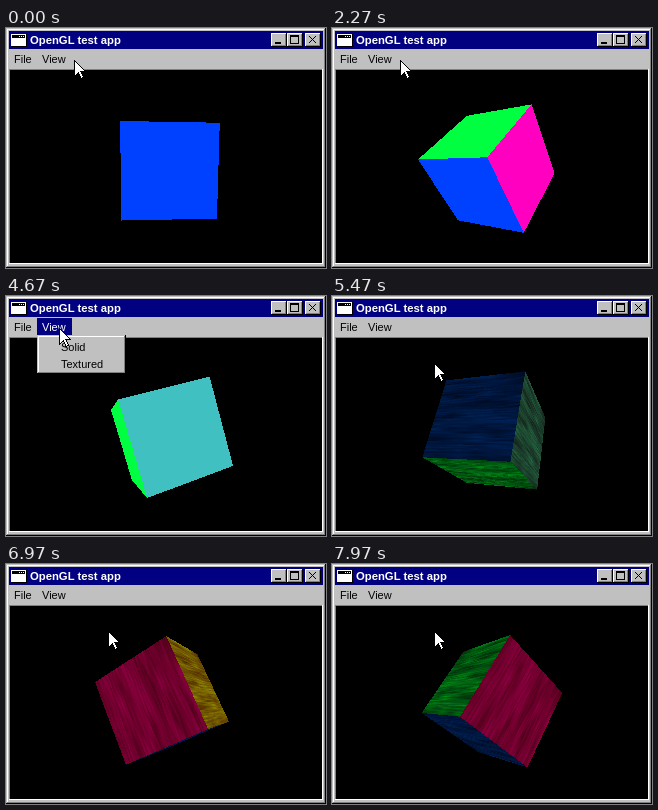
Animation of 320x240 px, one loop 8000 ms. Source, as an HTML page with a canvas:

```html
<!DOCTYPE html>
<html lang="en">
<head>
<meta charset="utf-8">
<title>OpenGL test app</title>
<style>
  html, body { margin: 0; width: 100%; height: 100%; overflow: hidden; background: #c0c0c0; }
  svg, canvas { position: absolute; left: 0; top: 0; }
  canvas { left: 80px; top: 65px; }
  svg { shape-rendering: crispEdges; font: 11px "Liberation Sans", Arial, sans-serif; }
  .title { font-weight: bold; font-size: 11.3px; fill: #fff; }
  .navy { fill: #000080; }
</style>
</head>
<body>
<svg width="320" height="240">
  <defs>
    <g id="button">
      <path d="M0 0H16V14H0Z"/>
      <path d="M0 0H15V13H0Z" fill="#fff"/>
      <path d="M1 1H15V13H1Z" fill="#808080"/>
      <path d="M1 1H14V12H1Z" fill="#c0c0c0"/>
    </g>
  </defs>
  <path d="M0 0H320V240H0Z"/>
  <path d="M0 0H319V239H0Z" fill="#c0c0c0"/>
  <path d="M1 1H319V239H1Z" fill="#808080"/>
  <path d="M1 1H318V238H1Z" fill="#fff"/>
  <path d="M2 2H318V238H2Z" fill="#c0c0c0"/>
  <path class="navy" d="M3 3H317V21H3Z"/>
  <path d="M3 41H317V236H3Z" fill="#fff"/>
  <path d="M3 41H316V235H3Z" fill="#808080"/>
  <path d="M4 42H316V235H4Z"/>

  <path d="M5 6H21V19H5Z"/>
  <path d="M5 6H20V18H5Z" fill="#fff"/>
  <path d="M6 7H19V10H6Z"/>
  <path d="M13 8h1v1h-1zM15 8h1v1h-1zM17 8h1v1h-1z" fill="#fff"/>
  <text class="title" x="24" y="16">OpenGL test app</text>

  <use href="#button" x="265" y="5"/>
  <use href="#button" x="281" y="5"/>
  <use href="#button" x="299" y="5"/>
  <path d="M269 14h6v2h-6z"/>
  <path d="M284 7h9v9h-9zM285 9v6h7v-6z" fill-rule="evenodd"/>
  <path d="M303 8l7 7M310 8l-7 7" stroke="#000" stroke-width="1.4"/>

  <text x="8" y="35">File</text>
  <text x="36" y="35">View</text>
</svg>

<canvas id="view" width="160" height="150"></canvas>

<svg width="320" height="240">
  <g id="menu" visibility="hidden">
    <path class="navy" d="M31 22H66V39H31Z"/>
    <text x="36" y="35" fill="#fff">View</text>
    <path d="M31 39H120V78H31Z"/>
    <path d="M31 39H119V77H31Z" fill="#c0c0c0"/>
    <path d="M32 40H119V77H32Z" fill="#808080"/>
    <path d="M32 40H118V76H32Z" fill="#fff"/>
    <path d="M33 41H118V76H33Z" fill="#c0c0c0"/>
    <rect id="bar" class="navy" x="34" width="84" height="17"/>
    <text class="item" x="55" y="55">Solid</text>
    <text class="item" x="55" y="72">Textured</text>
  </g>
  <path id="cursor" d="M.5 .5V16.5L4.5 12.5L7 18.5L9.5 17.5L7 11.5H11.5Z" fill="#fff" stroke="#000"/>
</svg>

<script>
const LOOP = 8000, FRAME = 100 / 3;
const MENU_OPEN = 4320, MENU_CLOSE = 5460;
const START_ANGLE = -174.6, TURN = 2.007;
const FOCAL = 246, DISTANCE = 6, CENTER_X = 159.8, CENTER_Y = 139;
const LEFT = 80, TOP = 65;

const byId = id => document.getElementById(id);
const canvas = byId('view'), ctx = canvas.getContext('2d');
const image = ctx.createImageData(canvas.width, canvas.height);
const items = document.querySelectorAll('.item');

// Face colours per axis: negative side, positive side.
const FACES = [
  [[64, 192, 192], [255, 0, 192]],
  [[255, 255, 0], [0, 255, 64]],
  [[255, 64, 0], [0, 64, 255]]
];
const WOOD = [0.43, 0.33, 0.23];
// Dark grain keeps more red than green or blue.
const DEPTH = [0.7, 1.4, 1.1];

// Wood grain: long soft streaks along u over broad bands.
const SIZE = 128;
const hash = (a, b) => {
  const s = Math.sin(a * 127.1 + b * 311.7) * 43758.5453;
  return s - Math.floor(s);
};
function noise(u, v) {
  const i = Math.floor(u), j = Math.floor(v);
  const mix = (a, b, k) => a + (b - a) * k;
  const row = n => mix(hash(i, n), hash(i + 1, n), u - i);
  return mix(row(j), row(j + 1), v - j);
}
const grain = Float32Array.from({ length: SIZE * SIZE }, (_, i) => {
  const u = i % SIZE, v = Math.floor(i / SIZE);
  return 0.45 + 0.55 * noise(u / 24, v / 1.6) + 0.55 * noise(u / 50 + 40, v / 8);
});
const texel = c => Math.max(0, Math.min(SIZE - 1, Math.floor((c + 1) / 2 * SIZE)));

function drawCube(degrees, textured) {
  const a = degrees * Math.PI / 180, c = Math.cos(a), s = Math.sin(a);
  // Object axes in view space: turn by -a about x, then by a about y.
  const axes = [[c, 0, -s], [-s * s, c, -c * s], [s * c, s, c * c]];
  const origin = axes.map(axis => axis[2] * DISTANCE);
  const dir = [0, 0, 0], hit = [0, 0, 0];
  const { width, height, data } = image;

  for (let y = 0, p = 0; y < height; y++) {
    const ry = (CENTER_Y - TOP - y - 0.5) / FOCAL;
    for (let x = 0; x < width; x++, p += 4) {
      const rx = (x + 0.5 + LEFT - CENTER_X) / FOCAL;
      let near = -Infinity, face = 0;
      for (let i = 0; i < 3; i++) {
        const axis = axes[i];
        dir[i] = axis[0] * rx + axis[1] * ry - axis[2];
        const t = (-Math.sign(dir[i]) - origin[i]) / dir[i];
        if (t > near) { near = t; face = i; }
      }
      let inside = true;
      for (let i = 0; i < 3; i++) {
        hit[i] = origin[i] + near * dir[i];
        if (i !== face && Math.abs(hit[i]) > 1) inside = false;
      }
      const color = FACES[face][dir[face] < 0 ? 1 : 0];
      const along = face === 0 ? 2 : 0, across = face === 1 ? 2 : 1;
      const shade = inside && textured
        ? grain[texel(hit[across]) * SIZE + texel(hit[along])] : 1;
      for (let k = 0; k < 3; k++) {
        const light = textured ? WOOD[k] * shade ** DEPTH[k] : 1;
        data[p + k] = inside ? color[k] * light : 0;
      }
      data[p + 3] = 255;
    }
  }
  ctx.putImageData(image, 0, 0);
}

function ease(t, from, to) {
  const k = Math.max(0, Math.min(1, (t - from) / (to - from)));
  return k * k * (3 - 2 * k);
}

function drawPointer(t) {
  const toItem = ease(t, 4750, 5260);
  const x = Math.round(68 - 15 * ease(t, 3930, 4240) + 49 * toItem);
  const y = Math.round(32 + 35 * toItem);
  byId('cursor').setAttribute('transform', `translate(${x} ${y})`);

  const open = t >= MENU_OPEN && t < MENU_CLOSE;
  const selected = open && y >= 42 ? (y < 59 ? 0 : 1) : -1;
  byId('menu').setAttribute('visibility', open ? 'visible' : 'hidden');
  byId('bar').setAttribute('y', 42 + 17 * Math.max(0, selected));
  byId('bar').setAttribute('opacity', selected < 0 ? 0 : 1);
  items.forEach((item, i) => item.setAttribute('fill', i === selected ? '#fff' : '#000'));
}

const start = performance.now();
let shown = -1;
function tick() {
  const t = (performance.now() - start) % LOOP;
  const step = Math.min(239, Math.floor((t + 5) / FRAME));
  if (step !== shown) {
    shown = step;
    const time = step * FRAME;
    drawCube(START_ANGLE + step * TURN, time >= MENU_CLOSE);
    drawPointer(time);
  }
  requestAnimationFrame(tick);
}
tick();
</script>
</body>
</html>
```
